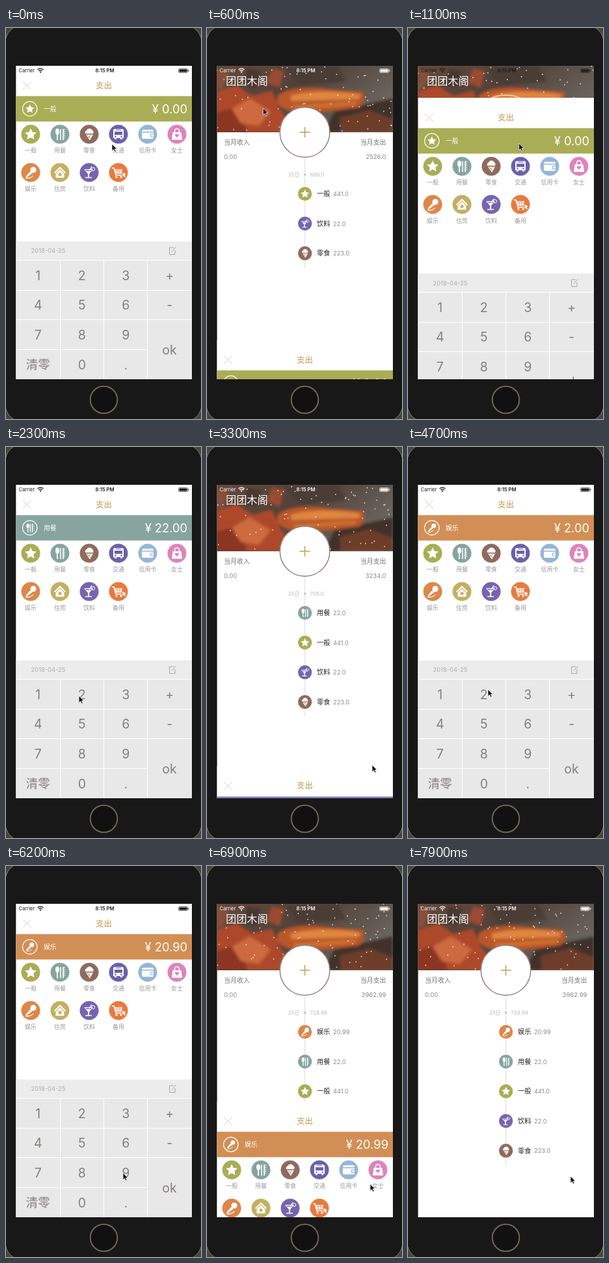
An HTML page for the animation above (8000 ms loop, 300 by 600 pixels).

```html
<!DOCTYPE html>
<html lang="zh">
<head>
<meta charset="utf-8">
<title>记账</title>
<style>
html, body { margin: 0; width: 100%; height: 100%; overflow: hidden; background: #181818; }
svg { display: block; width: 100vw; height: 100vh; }
text { font-family: Inter, "Noto Sans CJK SC", "Noto Sans CJK", sans-serif; white-space: pre; }
</style>
</head>
<body>
<svg id="stage" viewBox="0 0 300 600">
  <defs>
    <clipPath id="screenClip"><rect x="15.5" y="58" width="270.5" height="481"/></clipPath>
    <clipPath id="photoClip"><rect x="15" y="58" width="271" height="102"/></clipPath>
    <filter id="soft"><feGaussianBlur stdDeviation="2.2"/></filter>
    <linearGradient id="dusk" x2="1" y2=".5">
      <stop offset="0" stop-color="#64483b"/><stop offset=".5" stop-color="#51423a"/><stop offset="1" stop-color="#6c665f"/>
    </linearGradient>
  </defs>
  <rect width="300" height="600" fill="#45463b"/>
  <rect x="-1" y="-4" width="302" height="608" rx="26" fill="#181818" stroke="#85847b"/>
  <circle cx="150.5" cy="570.5" r="20.8" fill="#111" stroke="#706659" stroke-width="2"/>
  <g clip-path="url(#screenClip)">
    <rect x="15" y="58" width="271" height="481" fill="#fff"/>
    <g id="home"></g>
    <g id="sheet"></g>
    <g id="status"></g>
  </g>
  <path id="cursor" d="M0 0V10.5L2.5 8.3L4.2 12L6 11.2L4.4 7.6H7.6Z" fill="#111" stroke="#fff" stroke-width=".7"/>
</svg>
<script>
const LOOP = 8000, STEP = 100, SHEET_TRAVEL = 481;
const $ = id => document.getElementById(id);

const glyphs = {
  star: '<path d="M0-9L2.7-3.2L9-2.5L4.3 1.8L5.6 8L0 4.9L-5.6 8L-4.3 1.8L-9-2.5L-2.7-3.2Z" fill="#fff"/>',
  meal: '<ellipse cx="-4" cy="-4" rx="3" ry="4.7" fill="#fff"/><path d="M-4 0V9" stroke="#fff" stroke-width="1.8"/><path d="M1-8V9M5-8V9" stroke="#fff" stroke-width="1.6"/><path d="M5-7H8M5-4H8M5-1H8M5 2H8M5 5H8" stroke="#fff"/>',
  cone: '<path d="M-6-1A4 4 0 0 1-4-6A5 5 0 0 1 5-6A4 4 0 0 1 6-1Z M-5 .5H6L1 9.5Z" fill="#fff"/><path d="M-3 1L2 7M2 1L-1 5" stroke="#8f6a5d" stroke-width=".8"/>',
  bus: '<path d="M-6-8H6Q8-8 8-5V6H6V8H3V6H-3V8H-6V6H-8V-5Q-8-8-6-8Z" fill="#fff"/><path d="M-6-4H6V1H-6ZM-4-7H4V-6H-4Z" fill="#6a62aa"/><circle cx="-4.5" cy="3.5" r="1.2" fill="#6a62aa"/><circle cx="4.5" cy="3.5" r="1.2" fill="#6a62aa"/>',
  card: '<path d="M-9-4Q-9-7-6-7H7Q9-7 9-5V-4Z M-9-2.5H9V5Q9 7 7 7H-7Q-9 7-9 5Z" fill="#fff"/><path d="M9 0H4.5V4H9" fill="none" stroke="#94b6d8" stroke-width="1.2"/>',
  bag: '<path d="M-6.5-3H6.5L8 8.5H-8Z" fill="#fff"/><path d="M-3.5-2V-5A3.5 3.5 0 0 1 3.5-5V-2" fill="none" stroke="#fff" stroke-width="1.6"/><path d="M0 5L-3 2A1.6 1.6 0 0 1 0 .5A1.6 1.6 0 0 1 3 2Z" fill="#dd84bb"/>',
  mic: '<circle cx="4" cy="-4" r="4.6" fill="#fff"/><path d="M-.5-2L2.5 1L-6 7.5L-7.5 6Z" fill="#fff"/><path d="M-6 7Q-9 9-6 9Q0 9 4 5" fill="none" stroke="#fff" stroke-width="1.2"/>',
  house: '<path d="M0-9L9 0L7.5 1.5L0-6L-7.5 1.5L-9 0Z M0-4.5L6.5 2V8H-6.5V2Z" fill="#fff"/><circle cy="3" r="2.5" fill="#c3b062"/>',
  drink: '<path d="M-8-5H6L0 2V7H4V8.5H-6V7H-2V2Z" fill="#fff"/><path d="M-6-3.7H4L2.7-2.3H-4.6Z" fill="#7664ae"/><path d="M0-3L4-9" stroke="#fff" stroke-width="1.2"/><circle cx="6" cy="-5" r="2.6" fill="none" stroke="#fff"/>',
  cart: '<path d="M-10-7H-7L-4 4H5" fill="none" stroke="#fff" stroke-width="1.6"/><path d="M-6-5H6L4.5 2H-4.3Z" fill="#fff"/><path d="M-5-2.5H5M-2-5V2M2-5V2" stroke="#e97a3e" stroke-width=".7"/><circle cx="-3" cy="7" r="1.6" fill="#fff"/><circle cx="4" cy="7" r="1.6" fill="#fff"/><path d="M6 0L12 3L9.5 4L11 7L9.5 7.5L8.3 5L6.5 6.5Z" fill="#fff"/>'
};

const kinds = [
  ['一般', 'star', '#a9ad55'], ['用餐', 'meal', '#86a49e'], ['零食', 'cone', '#8f6a5d'],
  ['交通', 'bus', '#6a62aa'], ['信用卡', 'card', '#94b6d8'], ['女士', 'bag', '#dd84bb'],
  ['娱乐', 'mic', '#dd8749'], ['住房', 'house', '#c3b062'], ['饮料', 'drink', '#7664ae'], ['备用', 'cart', '#e97a3e']
];
const kindOf = name => kinds.find(k => k[0] === name);

// Text whose visual centre sits at y.
const label = (x, y, size, fill, str, anchor = 'start', weight = 400) =>
  `<text x="${x}" y="${y + size * .37}" font-size="${size}" fill="${fill}" text-anchor="${anchor}" font-weight="${weight}">${str}</text>`;
const glyph = (name, x, y, scale) => `<g transform="translate(${x} ${y}) scale(${scale})">${glyphs[name]}</g>`;
const badge = ([, name, color], x, y, r) => `<circle cx="${x}" cy="${y}" r="${r}" fill="${color}"/>` + glyph(name, x, y, r / 14.5);
const stroke = (d, color, width = 1) => `<path d="${d}" fill="none" stroke="${color}" stroke-width="${width}"/>`;

function buildSheet() {
  const grid = kinds.map((kind, i) => {
    const x = 38 + 45 * (i % 6), y = 163 + 58.7 * Math.floor(i / 6);
    return badge(kind, x, y, 14.5) + label(x, y + 24.5, 9, '#999', kind[0], 'middle');
  }).join('');
  const keys = ['1', '2', '3', '+', '4', '5', '6', '-', '7', '8', '9', '', '清零', '0', '.'].map((key, i) =>
    label(49.3 + 67.5 * (i % 4), 379.5 + 45.6 * Math.floor(i / 4), key === '清零' ? 18.5 : 19.5, '#867f79', key, 'middle')).join('');
  return `<rect x="15" y="58" width="271" height="481" fill="#fff"/>` +
    stroke('M26 82L38.5 94.5M38.5 82L26 94.5', '#d3d0cc') +
    label(150.5, 88, 12.5, '#c59a52', '支出', 'middle') +
    '<g id="bar"></g>' + grid +
    '<rect x="15" y="327.5" width="271" height="29" fill="#ececec"/>' +
    label(38.5, 342, 9.4, '#b3aea9', '2018-04-25') +
    stroke('M258 337H251.5V347.5H260V341M255 343.5L261.5 336', '#aaa5a0') +
    '<rect x="15" y="356.5" width="271" height="183" fill="#e8e8e8"/>' +
    stroke('M15 356.5H286M15 402.5H286M15 447.5H286M15 493.5H217.5M83.5 356V539M150.5 356V539M217.5 356V539', '#fff') +
    keys + label(251.5, 494, 19.5, '#867f79', 'ok', 'middle');
}

const barMarkup = (name, amount, color) =>
  `<rect x="15" y="104.5" width="271" height="39" fill="${color}"/>` +
  '<circle cx="36.7" cy="124" r="11.2" fill="none" stroke="#fff" stroke-width="1.2"/>' +
  glyph(kindOf(name)[1], 36.7, 124, .75) + label(58, 124, 9.8, '#fff', name) +
  label(279, 124, 18.3, '#fff', '¥ ' + amount, 'end');

const photo = `<g clip-path="url(#photoClip)"><rect x="15" y="58" width="271" height="102" fill="url(#dusk)"/><g filter="url(#soft)">
  <path d="M15 98L45 88L70 104L100 96L112 124L140 160H15Z" fill="#ad4a2a"/>
  <path d="M15 130L48 120L62 160H15Z" fill="#8c3520"/>
  <path d="M38 124L66 108L98 128L80 150L52 146Z" fill="#cd6a40"/>
  <path d="M100 62L118 66L112 92L92 84Z" fill="#9a4c30"/>
  <path d="M62 62L84 66L74 92L58 88Z" fill="#463830"/>
  <path d="M15 62L34 70L24 94H15Z" fill="#87503a"/>
  <path d="M180 160L196 128L286 108V160Z" fill="#40302a"/>
  <path d="M204 138L250 126L286 140V160H206Z" fill="#6d3d2c"/>
  <path d="M108 104Q130 86 190 94L240 98Q246 112 234 122L170 130Q124 134 108 116Z" fill="#b9572a"/>
  <path d="M128 104Q170 92 236 102L234 109L130 112Z" fill="#df8640"/>
  <path d="M132 119L230 113L228 118L136 125Z" fill="#d0722f"/>
  <path d="M122 62L200 58L214 82L140 88Z" fill="#493c34"/>
</g></g>`;

const entries = [['娱乐', '20.99'], ['用餐', '22.0'], ['一般', '441.0'], ['饮料', '22.0'], ['零食', '223.0']];

function homeMarkup(list, day, month) {
  const rows = list.map(([name, amount], i) => {
    const y = 254.5 + 45.6 * i;
    return badge(kindOf(name), 150.7, y, 10.6) + label(169, y, 10.2, '#222', name, 'start', 500) + label(194, y, 9.3, '#8b8b8b', amount);
  }).join('');
  return photo +
    label(29, 81, 16.2, '#fff', '团团木阁', 'start', 500) + '<path id="snow" stroke="#f4ece4" stroke-linecap="round"/>' +
    label(26, 175.5, 9.9, '#777', '当月收入') + label(26, 197, 9.5, '#8b8b8b', '0.00') +
    label(275.5, 175.5, 9.9, '#777', '当月支出', 'end') + label(275.5, 197, 9.5, '#8b8b8b', month, 'end') +
    stroke(`M150.7 198V${231 + 45.6 * list.length}`, '#dcdcdc') +
    label(142.5, 225, 8, '#bbb', '25日', 'end') + '<circle cx="150.7" cy="225" r="1.8" fill="#c4c4c4"/>' + label(158.5, 225, 8, '#bbb', day) + rows +
    '<circle id="ring" cx="150.5" cy="160" fill="none" stroke="#f3d9c4" stroke-width="1.5"/>' +
    '<circle cx="150.5" cy="160" r="38.3" fill="#fff" stroke="#7b6c78" stroke-width="1.2"/>' +
    stroke('M142.5 160H158.5M150.5 152V168', '#c3a35a', 1.6);
}

const statusMarkup = color =>
  label(19.5, 65.5, 7.6, color, 'Carrier') +
  stroke('M48.5 64A6.2 6.2 0 0 1 57.5 64M50.3 66A3.8 3.8 0 0 1 55.7 66', color, 1.2) + `<circle cx="53" cy="67.7" r="1.1" fill="${color}"/>` +
  label(152, 65.5, 7.6, color, '8:15 PM', 'middle', 600) +
  `<rect x="265.5" y="62.5" width="14" height="6" rx="1.4" fill="none" stroke="${color}" stroke-width=".6"/><rect x="266.5" y="63.4" width="12" height="4.2" rx=".7" fill="${color}"/><rect x="280.3" y="64.3" width="1" height="2.4" fill="${color}"/>`;

// Time tables: [ms, ...values]
const bars = [
  [0, '一般', '0.00', '#a9ad55'],
  [1500, '用餐', '0.00', '#87a49f'], [1900, '用餐', '2.00', '#87a49f'], [2200, '用餐', '22.00', '#87a49f'],
  [3300, '用餐', '22.00', '#7f83bb'], [3600, '一般', '0.00', '#a9ad55'],
  [4300, '娱乐', '0.00', '#d28f55'], [4700, '娱乐', '2.00', '#d28f55'], [5300, '娱乐', '20.00', '#d28f55'],
  [6100, '娱乐', '20.90', '#d28f55'], [6400, '娱乐', '20.99', '#d28f55']
];
const homes = [
  [0, entries.slice(2), '686.0', '2526.0'],
  [2900, entries.slice(1), '708.0', '3234.0'],
  [6700, entries, '728.99', '3962.99']
];
const moves = [[-1000, 'open'], [400, 'close'], [887, 'open'], [3087, 'close'], [3687, 'open'], [6787, 'close']];
const pointer = [
  [0, 163, 178], [100, 163, 178], [300, 32, 88], [450, 32, 88], [800, 170, 177], [1300, 171, 177],
  [1500, 85, 165], [1600, 85, 167], [1900, 113, 381], [2400, 112, 382], [2800, 253, 488], [3300, 254, 488],
  [3600, 165, 174], [4000, 165, 174], [4300, 39, 222], [4400, 40, 224], [4700, 123, 372], [4900, 123, 372],
  [5200, 118, 514], [5400, 118, 515], [5700, 184, 515], [5800, 184, 515], [6100, 180, 471], [6400, 180, 471],
  [6700, 251, 488], [7200, 251, 488], [7600, 251, 481], [7700, 251, 481], [7900, 250, 476]
];
const current = (table, t) => table.filter(row => row[0] <= t).pop();

function pointerAt(t) {
  const i = pointer.findIndex(p => p[0] > t);
  if (i < 0) return pointer[pointer.length - 1].slice(1);
  const [t0, x0, y0] = pointer[i - 1], [t1, x1, y1] = pointer[i];
  const u = (t - t0) / (t1 - t0), e = u * u * (3 - 2 * u);
  return [x0 + (x1 - x0) * e, y0 + (y1 - y0) * e];
}

let seed = 11;
const random = () => (seed = seed * 16807 % 2147483647) / 2147483647;
const flakes = Array.from({ length: 75 }, () => ({ x: random() * 270, y: random() * 102, speed: 8 + random() * 22, drift: random() * 8 - 4 }));
const snowPath = t => flakes.map(f => {
  const x = 15 + (f.x + f.drift * t / 1000 + 270) % 270, y = 58 + (f.y + f.speed * t / 1000) % 101;
  return `M${x.toFixed(1)} ${y.toFixed(1)}h.1`;
}).join('');

$('sheet').innerHTML = buildSheet();
const drawn = {};
function refresh(id, key, markup) {
  if (drawn[id] === key) return;
  drawn[id] = key;
  $(id).innerHTML = markup();
}

function render(t) {
  const bar = current(bars, t), home = current(homes, t), [start, action] = current(moves, t);
  const u = Math.min(1, (t - start) / 400), rest = (1 - u) ** 3, opening = action === 'open';
  const offset = SHEET_TRAVEL * (opening ? rest : 1 - rest);
  const [x, y] = pointerAt(t);
  refresh('bar', bar, () => barMarkup(...bar.slice(1)));
  refresh('home', home, () => homeMarkup(...home.slice(1)));
  refresh('status', action, () => statusMarkup(opening ? '#1c1c1c' : '#fff'));
  $('sheet').setAttribute('transform', `translate(0 ${offset.toFixed(2)})`);
  $('ring').setAttribute('r', 38.3 + (opening ? 35 * u : 0));
  $('snow').setAttribute('d', snowPath(t));
  $('snow').setAttribute('stroke-width', 1.7);
  $('cursor').setAttribute('transform', `translate(${x.toFixed(1)} ${y.toFixed(1)})`);
}

const origin = performance.now();
function tick() {
  const elapsed = Math.max(0, performance.now() - origin) % LOOP;
  render(Math.floor(elapsed / STEP) * STEP);
  requestAnimationFrame(tick);
}
tick();
</script>
</body>
</html>
```
